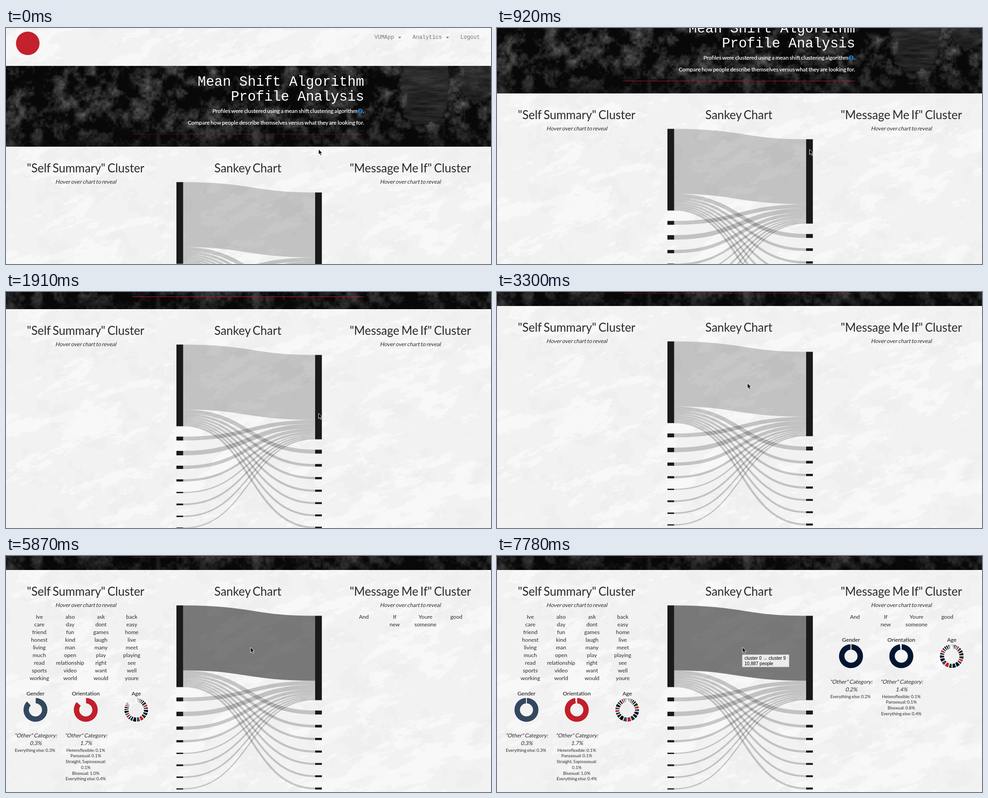
These frames come from a looping animation (1070 px wide and 523 px high, 8 s). An HTML page with a canvas:

```html
<!DOCTYPE html>
<html lang="en">
<head>
<meta charset="utf-8">
<title>Mean Shift Profile Analysis</title>
<style>
html, body { margin: 0; width: 100%; height: 100%; overflow: hidden; background: #f2f2f2; }
body { position: relative; }
canvas, svg { position: absolute; left: 0; top: 0; display: block; }
text { font: 12.13px Lato, sans-serif; word-spacing: -.085em; fill: #2b2b2b; text-anchor: middle; white-space: pre; }
.h2 { font-size: 26px; }
.small { font-size: 9.7px; }
.label { stroke: #2b2b2b; stroke-width: .15; }
.nav, .title { font: 12px "Liberation Mono", monospace; word-spacing: 0; fill: #777; text-anchor: start; }
.title { font-size: 30.6px; fill: #fff; text-anchor: end; }
.lead { fill: #fff; stroke: #fff; stroke-width: .25; text-anchor: end; }
.tip { font: 10px "Liberation Sans", sans-serif; word-spacing: 0; fill: #000; text-anchor: start; }
</style>
</head>
<body>
<canvas id="texture" width="1070" height="755"></canvas>
<svg id="stage" width="1070" height="523" viewBox="0 0 1070 523">
  <g id="page">
    <circle cx="48" cy="34" r="26" fill="#c4202d"/>
    <text class="nav" x="813" y="24">VUMApp</text>
    <text class="nav" x="897" y="24">Analytics</text>
    <text class="nav" x="1002.5" y="24">Logout</text>
    <path d="M865 19.5h7l-3.5 3.7zM970.500 19.500h7l-3.500 3.700z" fill="#777"/>
    <text class="title" x="790" y="128">Mean Shift Algorithm</text>
    <text class="title" x="790" y="161">Profile Analysis</text>
    <text class="lead" x="775" y="188">Profiles were clustered using a mean shift clustering algorithm</text>
    <circle cx="781.3" cy="184" r="5.6" fill="#2273b5"/>
    <text x="781.3" y="187.6" style="font-size:10px;font-weight:900;fill:#0b0b0b">?</text>
    <text class="lead" x="790" y="188">.</text>
    <text class="lead" x="790" y="214">Compare how people describe themselves versus what they are looking for.</text>
    <path id="rule" d="M278 235.500H790" stroke="#c8102e"/>
    <g id="main" transform="translate(0 232)"></g>
  </g>
  <g id="tooltip">
    <rect x="541" y="218.500" width="103.500" height="27.500" fill="#ebebeb" stroke="#a9a9a9" stroke-width=".8"/>
    <text class="tip" x="546" y="230">cluster 0 → cluster 9</text>
    <text class="tip" x="546" y="241.500">10,887 people</text>
  </g>
  <path id="cursor" d="M.5 .8V12.600L3.200 10.100 5.200 14.600 7.300 13.700 5.300 9.300H9Z" fill="#000" stroke="#fff" stroke-width=".9"/>
</svg>
<script>
const $ = id => document.getElementById(id);
const LOOP = 8000;
const main = $('main');

function add(parent, tag, attrs = {}, content = '') {
  const node = document.createElementNS('http://www.w3.org/2000/svg', tag);
  for (const k in attrs) node.setAttribute(k, attrs[k]);
  node.textContent = content;
  return parent.appendChild(node);
}
const label = (parent, x, y, str, cls = '') => add(parent, 'text', { x, y, class: cls }, str);
const slanted = (parent, x, y, str) =>
  add(parent, 'text', { transform: `translate(${x} ${y}) skewX(-13)` }, str);

// Seeded value noise for the paper and stone textures
function hash(x, y) {
  let h = Math.imul(x, 374761393) + Math.imul(y, 668265263) | 0;
  h = Math.imul(h ^ h >>> 13, 1274126177);
  return ((h ^ h >>> 16) >>> 0) / 2 ** 32;
}
function noise(x, y) {
  const i = Math.floor(x), j = Math.floor(y);
  let u = x - i, v = y - j;
  u *= u * (3 - 2 * u);
  v *= v * (3 - 2 * v);
  const a = hash(i, j), b = hash(i, j + 1);
  const top = a + (hash(i + 1, j) - a) * u;
  return top + (b + (hash(i + 1, j + 1) - b) * u - top) * v;
}
function fbm(x, y) {
  let sum = 0;
  for (let k = 0, amp = .396; k < 5; k++, amp *= .65) {
    sum += amp * noise(x, y);
    x = x * 2 + 17;
    y = y * 2 + 31;
  }
  return sum;
}
function smooth(a, b, v) {
  const p = Math.min(1, Math.max(0, (v - a) / (b - a)));
  return p * p * (3 - 2 * p);
}
function paper(x, y) {
  const n = fbm((x + y * .4) / 60, (y + x * .25) / 28);
  return 242 + 6 * smooth(.53, .58, n) - 3 * smooth(.58, .64, fbm(x / 40 + 90, y / 40));
}
function stone(x, y) {
  const n = fbm(x / 24, y / 24), rough = (n - .5) * .8;
  const patch = (cx, cy, rx, ry) =>
    smooth(1.06, .94, Math.hypot((x - cx) / rx, (y - cy) / ry) + rough);
  const slab = Math.max(patch(924, 130, 52, 90), .7 * patch(1040, 115, 40, 45));
  const grain = 8 + 190 * Math.max(0, n - .41) * (1 - .4 * smooth(200, 262, y));
  const streaks = 44 + 60 * (fbm(x / 40, y / 6) - .5) - 14 * smooth(120, 220, y);
  return grain + (streaks - grain) * slab;
}
function paintTexture() {
  const ctx = $('texture').getContext('2d');
  const img = ctx.createImageData(1070, 755);
  for (let y = 0, p = 0; y < 755; y++) {
    for (let x = 0; x < 1070; x++, p += 4) {
      const v = y >= 84 && y < 263 ? stone(x, y) : paper(x, y);
      img.data[p] = img.data[p + 1] = img.data[p + 2] = v;
      img.data[p + 3] = 255;
    }
  }
  ctx.putImageData(img, 0, 0);
}

// Sankey chart: one thick link, the rest cross between the two big nodes
const LEFT_X = 376, RIGHT_X = 682, NODE_W = 14.8, GAP = 23, BIG = 144;
function bar(x, y, h) {
  add(main, 'rect', { x, y, width: NODE_W, height: h, fill: '#1a1a1a' });
}
function link(y0, y1, h) {
  const x0 = LEFT_X + NODE_W, mid = (x0 + RIGHT_X) / 2;
  y0 += h / 2;
  y1 += h / 2;
  return add(main, 'path', {
    d: `M${x0} ${y0}C${mid} ${y0} ${mid} ${y1} ${RIGHT_X} ${y1}`,
    fill: 'none', stroke: '#000', 'stroke-opacity': .2, 'stroke-width': h
  });
}
function sankey() {
  const fromLeft = [8.6, 9.8, 7.2, 4.8, 2.9, 3.8, 3.2, 2.7];
  const toRight = [8.7, 5.8, 5, 4.7, 4.2, 4.2, 4.4];
  const sum = list => list.reduce((a, b) => a + b, BIG);
  const top0 = 109.5, top1 = 132.5;
  const big = link(top0, top1, BIG);
  const side = (sizes, x, y, port, connect) => {
    for (const h of sizes) {
      y += GAP;
      connect(y, port, h);
      bar(x, y, h);
      y += h;
      port += h;
    }
  };
  side(fromLeft, LEFT_X, top0 + sum(toRight), top1 + BIG, (y, port, h) => link(y, port, h));
  side(toRight, RIGHT_X, top1 + sum(fromLeft), top0 + BIG, (y, port, h) => link(port, y, h));
  bar(LEFT_X, top0, sum(toRight));
  bar(RIGHT_X, top1, sum(fromLeft));
  return big;
}

// Donut charts
const PALETTE = ['#021631', '#0d3b26', '#c11f2c', '#34475f', '#000'];
function ages(shift) {
  const n = 26, list = [];
  for (let i = 0; i < n; i++)
    list.push([.3 + Math.sin(Math.PI * (i + .5) / n) * (.7 + .6 * hash(i, shift)), PALETTE[(i + shift) % 5]]);
  const total = list.reduce((a, s) => a + s[0], 0);
  return list.map(([w, c]) => [w / total, c]);
}
function donut(parent, cx, cy, inner, edge, slices) {
  const R = 27;
  const paths = slices.map(([, fill]) => add(parent, 'path', { fill, stroke: '#fff', 'stroke-width': edge }));
  const point = (r, a) => `${cx + r * Math.sin(a)} ${cy - r * Math.cos(a)}`;
  return sweep => {
    let a = 0;
    slices.forEach(([part], i) => {
      const b = a + part * sweep * 2 * Math.PI, big = b - a > Math.PI ? 1 : 0;
      paths[i].setAttribute('d', `M${point(R, a)}A${R} ${R} 0 ${big} 1 ${point(R, b)}` +
        `L${point(inner, b)}A${inner} ${inner} 0 ${big} 0 ${point(inner, a)}Z`);
      a = b;
    });
  };
}

function wordGrid(dx, rows) {
  const g = add(main, 'g');
  rows.forEach((row, j) => row.split(' ').forEach((w, i) => label(g, 73.5 + dx + i * 68, 139 + j * 17, w)));
  return g;
}
function details(dx, dy, o) {
  const g = add(main, 'g', { transform: `translate(${dx} ${dy})` });
  ['Gender', 'Orientation', 'Age'].forEach((s, i) => label(g, [65, 176, 287.3][i], 309, s, 'label'));
  const charts = [
    donut(g, 65, 341, 14, 1, [[1 - o.gender / 100, o.colors[0]], [o.gender / 100, '#fff']]),
    donut(g, 176, 341, 14, 1, [[1 - o.orient / 100, o.colors[1]], [o.orient / 100, '#fff']]),
    donut(g, 287.3, 341, 16, 1.7, ages(o.shift))
  ];
  [[65.5, o.gender], [176.5, o.orient]].forEach(([x, v]) => {
    slanted(g, x, 402, '"Other" Category:');
    slanted(g, x, 419, v + '%');
  });
  label(g, 64, 433.5, `Everything else: ${o.gender}%`, 'small');
  o.lines.forEach((s, i) => label(g, 176, 433.5 + i * 12.75, s, 'small'));
  return { g, draw: sweep => charts.forEach(c => c(sweep)) };
}

paintTexture();
label(main, 175.7, 88, '"Self Summary" Cluster', 'h2');
label(main, 533.5, 88, 'Sankey Chart', 'h2');
label(main, 892, 88, '"Message Me If" Cluster', 'h2');
slanted(main, 176, 113, 'Hover over chart to reveal');
slanted(main, 892, 113, 'Hover over chart to reveal');
const bigLink = sankey();
const leftWords = wordGrid(0, [
  'Ive also ask back', 'care day dont easy', 'friend fun games home',
  'honest kind laugh live', 'living man many meet', 'much open play playing',
  'read relationship right see', 'sports video want well', 'working world would youre']);
const rightWords = wordGrid(716, ['And If Youre good', ' new someone']);
const leftInfo = details(0, 0, {
  gender: .3, orient: 1.7, colors: ['#34475f', '#c11f2c'], shift: 0,
  lines: ['Heteroflexible: 0.1%', 'Pansexual: 0.1%', 'Straight, Sapiosexual:', '0.1%',
    'Bisexual: 1.0%', 'Everything else: 0.4%']
});
const rightInfo = details(716, -119, {
  gender: .2, orient: 1.4, colors: ['#021631', '#021631'], shift: 3,
  lines: ['Heteroflexible: 0.1%', 'Pansexual: 0.1%', 'Bisexual: 0.8%', 'Everything else: 0.4%']
});

// Motion: keys are [time, ...values]; the picture only changes at the ticks
const TICKS = [0, 450, 690, 920, 1160, 1400, 1670, 1910, 2150, 2650, 2810, 2970, 3140, 3300,
  4620, 4770, 4910, 5360, 5530, 5700, 5870, 6010, 6180, 6340, 6520, 6710, 6900, 7100, 7290,
  7480, 7630, 7780];
const SCROLL = [[400, 0], [690, 68], [920, 118], [1160, 150], [1400, 170], [1910, 225], [2150, 232]];
const POINTER = [[2600, 689, 268], [2970, 612, 223], [3300, 552, 201.5], [4550, 552, 201.5],
  [4910, 539, 201.5], [6500, 539, 201.5], [6710, 541, 201.5]];
const GLOW = [[450, .4], [920, .9], [1400, .5], [1910, 1], [2150, .5]];

function at(keys, t) {
  const i = keys.findIndex(k => k[0] > t);
  if (i === 0) return keys[0].slice(1);
  if (i < 0) return keys[keys.length - 1].slice(1);
  const a = keys[i - 1], b = keys[i], p = (t - a[0]) / (b[0] - a[0]);
  return a.slice(1).map((v, j) => v + (b[j + 1] - v) * p);
}
function bounce(p) {
  p = Math.min(1, Math.max(0, p)) * 2.75;
  if (p < 1) return p * p;
  if (p < 2) return (p - 1.5) ** 2 + .75;
  if (p < 2.5) return (p - 2.25) ** 2 + .9375;
  return (p - 2.625) ** 2 + .984375;
}
const show = (node, on) => node.setAttribute('visibility', on ? 'visible' : 'hidden');

function draw(t) {
  const y = Math.round(at(SCROLL, t)[0]);
  $('texture').style.top = -y + 'px';
  $('page').setAttribute('transform', `translate(0 ${-y})`);
  $('rule').setAttribute('stroke-opacity', at(GLOW, t)[0]);
  $('cursor').setAttribute('transform', `translate(${at(POINTER, t)})`);
  bigLink.setAttribute('stroke-opacity', t >= 4620 ? .5 : .2);
  show(leftWords, t >= 4770);
  show(rightWords, t >= 5360);
  show(leftInfo.g, t >= 5360);
  show(rightInfo.g, t >= 6340);
  show($('tooltip'), t >= 7100);
  leftInfo.draw(bounce((t - 5358) / 1500));
  rightInfo.draw(bounce((t - 6270) / 1500));
}

let shown = -1;
function frame() {
  const now = performance.now() % LOOP;
  const tick = TICKS.filter(k => k <= now).pop();
  if (tick !== shown) draw(shown = tick);
  requestAnimationFrame(frame);
}
frame();
</script>
</body>
</html>
```
